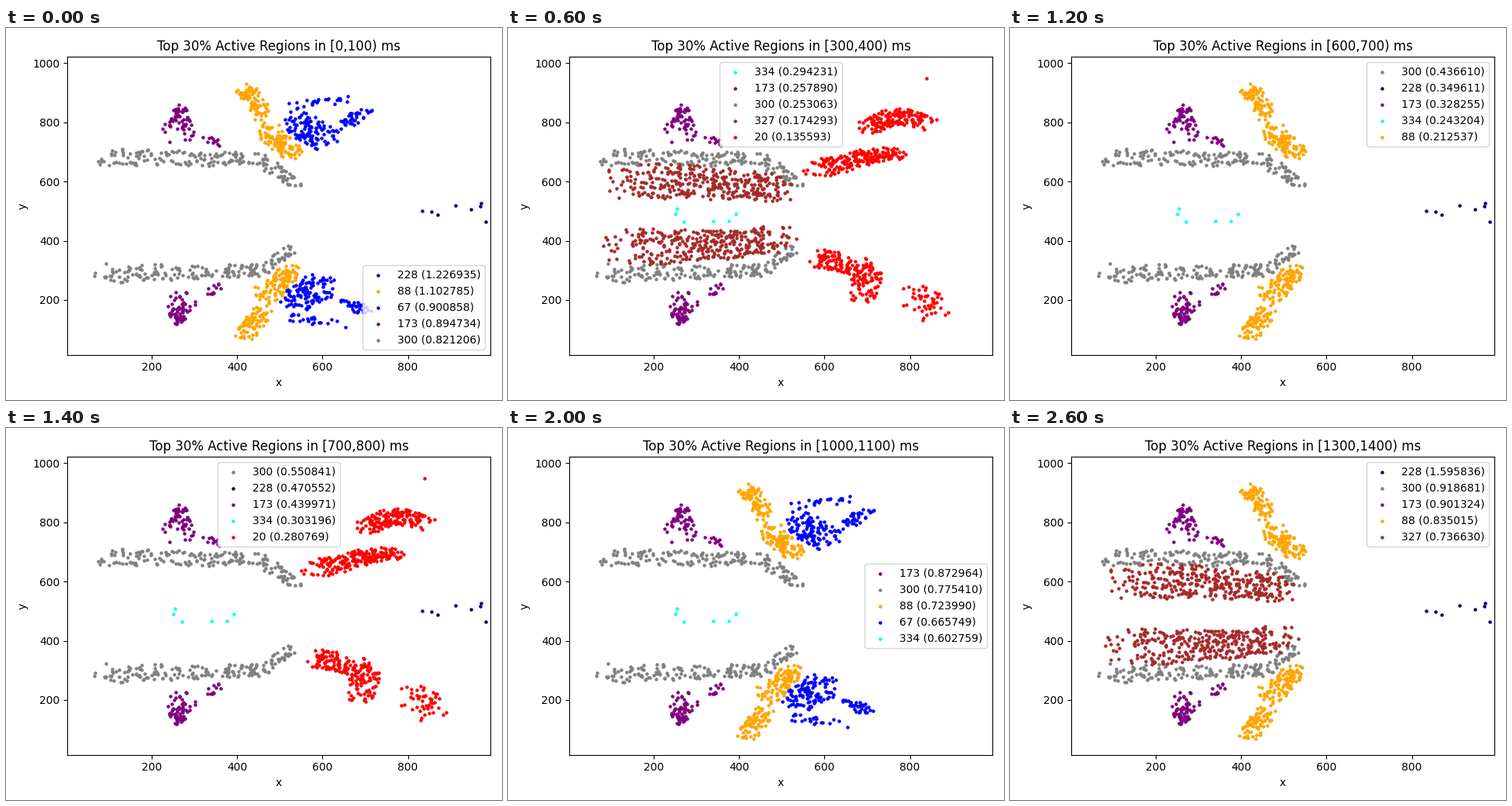
Write a matplotlib script that moves like this. It is 640 px wide and 480 px high and loops after 2.8 s.

```python
import numpy as np
import matplotlib.pyplot as plt
from matplotlib.animation import FuncAnimation

STEP_MS = 200
WINDOW_MS = 100

fig = plt.figure(figsize=(6.4, 4.8), dpi=100)
ax = fig.add_subplot()
ax.set(xlim=(2.5, 993.1), ylim=(15, 1020.5), xlabel="x", ylabel="y",
       xticks=range(200, 801, 200), yticks=range(200, 1001, 200))
ax.set_title("Top 30% Active Regions in [0,100) ms")
fig.tight_layout()

rng = np.random.default_rng(7)


def spray(n, r0, r1, *path):
    """Scatter n points along a path whose radius goes from r0 to r1."""
    path = np.array(path, float)
    dist = np.r_[0, np.cumsum(np.hypot(*np.diff(path, axis=0).T))]
    t = rng.random(n)
    centre = np.column_stack([np.interp(t * dist[-1], dist, p) for p in path.T])
    angle = rng.uniform(0, 2 * np.pi, n)
    reach = (r0 + (r1 - r0) * t) * rng.random(n) ** 0.4
    return centre + reach[:, None] * np.column_stack([np.cos(angle), np.sin(angle)])


def twin(total, *strokes):
    """Spray strokes and their mirror images, where y becomes total - y."""
    upper = [spray(*s) for s in strokes]
    lower = [spray(*s) * (1, -1) + (0, total) for s in strokes]
    return np.vstack(upper + lower)


def region(number, color, xy):
    dots = ax.scatter(*np.transpose(xy), s=5, color=color)
    return number, dots


regions = {
    "n": region(228, "navy", [(833, 501), (855, 498), (870, 488), (912, 520),
                              (948, 506), (970, 516), (972, 527), (982, 464)]),
    "c": region(334, "cyan", [(250, 491), (254, 509), (270, 465),
                              (340, 467), (375, 467), (392, 491)]),
    "g": region(300, "gray", twin(
        975, (180, 34, 18, (80, 685), (450, 676), (540, 590)))),
    "p": region(173, "purple", twin(
        972, (62, 12, 46, (266, 850), (265, 765)),
        (11, 12, 12, (320, 755), (365, 720)))),
    "o": region(88, "orange", twin(
        997, (72, 26, 28, (420, 912), (460, 830)),
        (100, 36, 28, (468, 775), (525, 700)))),
    "b": region(67, "blue", twin(
        1000, (115, 42, 46, (540, 800), (595, 750)),
        (36, 26, 14, (635, 785), (705, 842)),
        (24, 16, 14, (520, 860), (660, 878)))),
    "k": region(348, "pink", twin(
        1020, (95, 28, 28, (335, 915), (395, 905)),
        (50, 42, 30, (345, 860), (405, 815)),
        (46, 26, 32, (375, 755), (430, 735)),
        (12, 12, 16, (280, 870), (300, 895)))),
    "w": region(327, "brown", twin(
        982, (350, 66, 48, (140, 602), (290, 602), (495, 575)))),
    "r": region(20, "red", np.vstack([
        spray(190, 34, 24, (578, 640), (690, 680), (775, 698)),
        spray(165, 28, 30, (698, 780), (765, 825), (838, 803)),
        spray(190, 34, 36, (580, 345), (670, 320), (700, 280), (685, 220)),
        spray(48, 50, 48, (815, 210), (850, 175)),
        [(839, 948)]])),
}

# Region keys of each window, most active first
ranking = ("nobpg npgow npgcw cpgwr cpgwr cpgwr gnpco "
           "gnpcr gnokp gpnok pgobc npogk pogwk ngpow").split()

# Activity by rank at some windows; the ones between are interpolated
levels = {
    0: (1.226935, 1.102785, 0.900858, 0.894734, 0.821206),
    3: (0.294231, 0.257890, 0.253063, 0.174293, 0.135593),
    5: (0.322379, 0.228669, 0.216539, 0.183213, 0.144305),
    7: (0.550841, 0.470552, 0.439971, 0.303196, 0.280769),
    9: (0.831924, 0.703184, 0.635988, 0.600970, 0.585121),
    11: (0.914003, 0.847636, 0.811991, 0.730527, 0.620397),
    13: (1.595836, 0.918681, 0.901324, 0.835015, 0.736630),
}


def legend_place(keys):
    """Choose the spot that covers the fewest points."""
    if "r" in keys:
        return "upper center"
    if "b" in keys:
        return "lower right" if "n" in keys else "center right"
    return "upper right"


def update(i):
    keys = ranking[i]
    for key, (_, dots) in regions.items():
        dots.set_visible(key in keys)
    handles, labels = [], []
    for rank, (key, series) in enumerate(zip(keys, zip(*levels.values()))):
        number, dots = regions[key]
        dots.set_zorder(1 + rank / 10)
        handles.append(dots)
        labels.append(f"{number} ({np.interp(i, list(levels), series):.6f})")
    ax.legend(handles, labels, loc=legend_place(keys))
    start = i * WINDOW_MS
    ax.set_title(f"Top 30% Active Regions in [{start},{start + WINDOW_MS}) ms")
    return []


anim = FuncAnimation(fig, update, frames=len(ranking), interval=STEP_MS, repeat=True)
plt.show()
```
